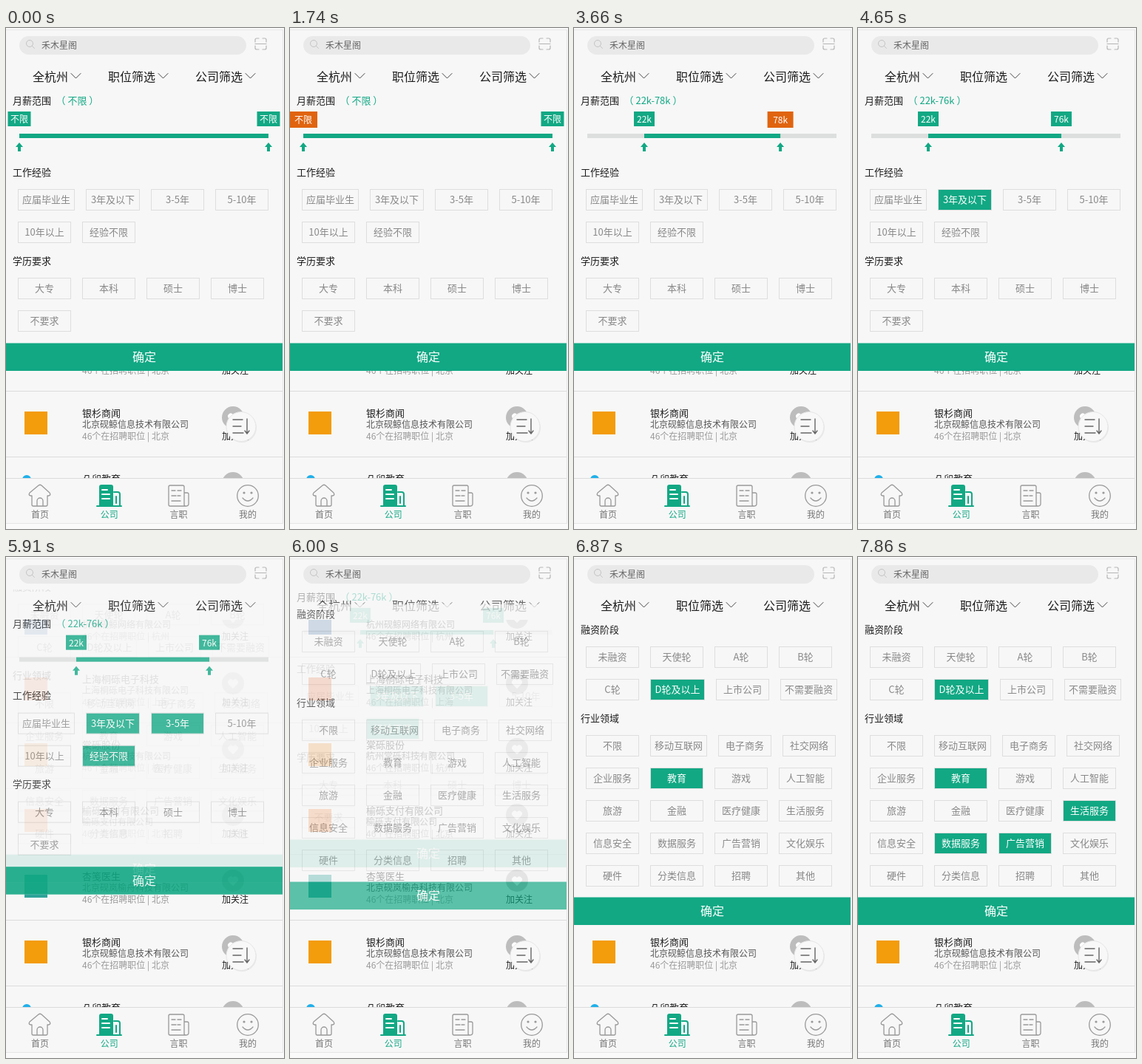
An HTML page that plays this animation: 376 px wide and 678 px high, repeating every 8460 ms.

```html
<!DOCTYPE html>
<html lang="zh-CN">
<head>
<meta charset="utf-8">
<title>职位筛选</title>
<style>
  html, body { margin: 0; width: 100%; height: 100%; overflow: hidden; background: #fafafa; }
  svg { display: block; font-family: "Noto Sans CJK SC", "Noto Sans CJK", "Noto Sans", sans-serif; }
  .line { fill: none; stroke-linecap: round; stroke-linejoin: round; }
  .chip rect { fill: none; stroke: #dedede; }
  .chip text { fill: #888; }
  .chip.on rect { fill: #12a884; }
  .chip.on text { fill: #fff; font-weight: 500; }
</style>
</head>
<body>
<svg id="stage" width="376" height="678" viewBox="0 0 376 678"></svg>
<script>
const LOOP = 8460, STEP = 30;
const GREEN = '#12a884', ORANGE = '#e0640f', PAGE = '#f7f7f7', INK = '#1c1c1c';
const TRACK_LEFT = 18, TRACK_RIGHT = 355;

const text = (s, x, y, size = 13, fill = INK, anchor = 'start', extra = '') =>
  `<text x="${x}" y="${y + size * .37}" font-size="${size}" fill="${fill}" text-anchor="${anchor}" ${extra}>${s}</text>`;
const rect = (x, y, w, h, fill, extra = '') =>
  `<rect x="${x}" y="${y}" width="${w}" height="${h}" fill="${fill}" ${extra}/>`;
const circle = (x, y, r, fill, extra = '') =>
  `<circle cx="${x}" cy="${y}" r="${r}" fill="${fill}" ${extra}/>`;
const line = (d, color, width = 1.3) =>
  `<path class="line" d="${d}" stroke="${color}" stroke-width="${width}"/>`;

// Time at which each option becomes selected.
const selectAt = {
  '3年及以下': 4650, '3-5年': 4950, '经验不限': 5340,
  'D轮及以上': 6570, '教育': 6870, '生活服务': 7200, '广告营销': 7500, '数据服务': 7860
};

const chipWidth = s =>
  Math.max(72, [...s].reduce((w, c) => w + (c >= '一' ? 13 : c > '@' ? 10 : 9), 12));

function chips(y, rows) {
  return rows.map((row, i) => {
    let x = 16;
    return row.split(' ').map(s => {
      const w = chipWidth(s), top = y + i * 44;
      const chip = `<g class="chip" data-on="${selectAt[s] || Infinity}">
        <rect x="${x + .5}" y="${top + .5}" width="${w - 1}" height="28"/>
        ${text(s, x + w / 2, top + 14.5, 13, '', 'middle')}</g>`;
      x += w + 15;
      return chip;
    }).join('');
  }).join('');
}

const panel = (id, bottom, content) => `<g id="${id}">
  ${rect(0, 85, 374, bottom - 85, PAGE)}${content}
  ${rect(0, bottom - 37.5, 374, 37.5, GREEN)}
  ${text('确定', 187, bottom - 18.5, 16, '#fff', 'middle')}</g>`;

const companies = [
  ['杭州砚鲸网络', '杭州砚鲸网络有限公司', '杭州', '#3d6fa8'],
  ['上海桐砾电子科技', '上海桐砾电子科技有限公司', '上海', '#e8703c'],
  ['棠砾股份', '杭州棠砾科技有限公司', '杭州', '#f08a24'],
  ['榆砾支付有限公司', '榆砾支付有限公司', '北京', '#f07a2a'],
  ['杏笺医生', '北京砚岚榆舟科技有限公司', '北京', '#2fa39a'],
  ['银杉商闻', '北京砚鲸信息技术有限公司', '北京', '#f39c0c'],
  ['朵卯教育', '北京朵卯教育科技有限公司', '北京', '#1fb0ea']
];

function company([name, full, city, color], i) {
  const y = 76 + i * 89;
  const logo = i == 6 ? circle(28, y + 1, 6, color) : rect(25, y - 2, 31, 31, color);
  return logo + text(name, 103, y) + text(full, 103, y + 16, 12, '#555') +
    text(`46个在招聘职位 | ${city}`, 103, y + 32, 12, '#999') +
    circle(307, y + 6, 15, '#bdbdbd') +
    `<path d="M307 ${y + 13}l-6-6a3.7 3.7 0 0 1 6-5a3.7 3.7 0 0 1 6 5z" fill="#fff"/>` +
    text('加关注', 310, y + 32, 12, INK, 'middle') +
    rect(0, y + 59, 374, 1, '#dcdcdc');
}

const tab = (label, x) => text(label, x, 66, 16) +
  line(`M${x + label.length * 16 + 4} 61.5l6.5 6.5l6.5-6.5`, '#444', 1);

const GRAY = '#999';
const navBar = rect(0, 609, 374, 61, PAGE) + rect(0, 609, 374, 1, '#dcdcdc') +
  line('M35 633h-2q-3-1-1-4l12-10q2-1.500 4 0l11 10q2 3-1 4h-2v12q0 2-2 2h-17q-2 0-2-2zM42 647v-7a4 4 0 0 1 8 0v7', GRAY) +
  `<path d="M126 647v-26q0-3 3-3h13q3 0 3 3v26z" fill="${GREEN}"/>` +
  line('M130 625h7M130 631h10M130 637h10', '#fff', 2) +
  line('M123 647h33M146 628h5q3 0 3 3v16M149 634v9', GREEN, 2) +
  line('M222 619h17q2 0 2 2v24q0 2 2 2h-21q-2 0-2-2v-24q0-2 2-2zM241 629h4q2 0 2 2v13q0 3-4 3M224 626h5M232 626h5M224 633h6M224 640h12M232 633h4', GRAY) +
  circle(327, 633, 14.3, 'none', `stroke="${GRAY}" stroke-width="1.3"`) +
  circle(322, 629, 1.6, GRAY) + circle(332, 629, 1.6, GRAY) +
  line('M320 636q7 8 14 0', GRAY) +
  ['首页', '公司', '言职', '我的'].map((s, i) =>
    text(s, 46 + i * 93.7, 659, 12, i == 1 ? GREEN : '#777', 'middle')).join('');

const searchBar = rect(0, 3, 374, 41, PAGE) + rect(18, 11, 307, 25, '#e9e9e9', 'rx="12.5"') +
  circle(32, 21, 4.500, 'none', 'stroke="#c4c4c4"') + line('M35.500 24.500l3 3', '#c4c4c4', 1) +
  text('禾木星阁', 48, 24, 12, '#666') +
  line('M337 19v-3q0-2 2-2h3M347 14h3q2 0 2 2v3M352 24v3q0 2-2 2h-3M342 29h-3q-2 0-2-2v-3M337 21.500h15', '#b5b5b5', 1.2);

const sortButton = circle(319, 541, 20, '#000', 'opacity=".06"') + circle(318, 539.5, 20, '#f8f8f8', 'stroke="#e6e6e6"') +
  line('M307 530h13M307 539h11M307 548h14M326 529v20l-3-4M326 549l3-4', '#666', 1.4);

const stage = document.getElementById('stage');
stage.innerHTML = rect(0, 3, 374, 667, PAGE) +
  companies.map(company).join('') +
  rect(0, 3, 374, 82, PAGE) + tab('全杭州', 36) + tab('职位筛选', 138) + tab('公司筛选', 256) +
  panel('jobs', 464,
    text('月薪范围', 9, 98) + '<g id="salary"></g>' +
    text('工作经验', 9, 195) + chips(218, ['应届毕业生 3年及以下 3-5年 5-10年', '10年以上 经验不限']) +
    text('学历要求', 9, 315) + chips(338, ['大专 本科 硕士 博士', '不要求'])) +
  panel('firms', 498,
    text('融资阶段', 9, 98) + chips(121, ['未融资 天使轮 A轮 B轮', 'C轮 D轮及以上 上市公司 不需要融资']) +
    text('行业领域', 9, 218) + chips(241, ['不限 移动互联网 电子商务 社交网络', '企业服务 教育 游戏 人工智能',
      '旅游 金融 医疗健康 生活服务', '信息安全 数据服务 广告营销 文化娱乐', '硬件 分类信息 招聘 其他'])) +
  searchBar + sortButton + navBar +
  rect(0, 2, 375, 1, '#e6e6e6') + rect(374, 2, 1, 669, '#e6e6e6') + rect(0, 670, 375, 1, '#e6e6e6');

const [salary, jobs, firms] = ['salary', 'jobs', 'firms'].map(id => document.getElementById(id));
const allChips = [...document.querySelectorAll('.chip')];

const leftPath = [[1770, 18], [1800, 42], [2160, 160], [2310, 173], [2430, 165], [2580, 123], [2610, 109.3], [2730, 95]];
const rightPath = [[3480, 355], [3510, 344], [3540, 304], [3810, 248], [3960, 248], [4140, 275]];

function follow(path, t) {
  const i = path.findIndex(([time]) => time > t);
  if (i < 0) return path[path.length - 1][1];
  if (i == 0) return path[0][1];
  const [t0, x0] = path[i - 1], [t1, x1] = path[i];
  return x0 + (x1 - x0) * (t - t0) / (t1 - t0);
}

// The CSS "ease" curve.
function ease(x) {
  if (x <= 0 || x >= 1) return x <= 0 ? 0 : 1;
  let lo = 0, hi = 1, s;
  for (let i = 0; i < 20; i++) {
    s = (lo + hi) / 2;
    if (.75 * s * (1 - s) + s ** 3 < x) lo = s; else hi = s;
  }
  return .3 * s * (1 - s) ** 2 + 3 * s * s * (1 - s) + s ** 3;
}

function amount(x, dragging) {
  if (x <= TRACK_LEFT || x >= TRACK_RIGHT) return '不限';
  return Math.floor((x - TRACK_LEFT) / (TRACK_RIGHT - TRACK_LEFT) * 100 + (dragging ? 1 : 0)) + 'k';
}

function handle(x, label, dragging) {
  const w = (label == '不限' ? 24 : 21) + (dragging ? 14 : 7), h = dragging ? 22 : 20;
  return rect(x - w / 2, 113, w, h, dragging ? ORANGE : GREEN) +
    text(label, x, 113 + h / 2 + .5, 12, '#fff', 'middle', 'font-weight="500"') +
    `<path d="M${x} 155l5 6h-3v6h-4v-6h-3z" fill="${GREEN}"/>`;
}

function salaryRange(t) {
  const left = follow(leftPath, t), right = follow(rightPath, t);
  const dragLeft = t >= 1740 && t < 2820, dragRight = t >= 3450 && t < 4200;
  const low = amount(left, dragLeft), high = amount(right, dragRight);
  const range = low == high && low == '不限' ? low : `${low}-${high == '不限' ? '' : high}`;
  return text(`（ ${range} ）`, 67.5, 98, 13, GREEN) +
    rect(TRACK_LEFT, 143, TRACK_RIGHT - TRACK_LEFT, 6, '#dcdfde') +
    rect(left, 143, right - left, 6, GREEN) +
    handle(left, low, dragLeft) + handle(right, high, dragRight);
}

function place(group, opacity, y) {
  group.setAttribute('opacity', opacity);
  group.setAttribute('transform', `translate(0 ${y})`);
}

function frame(now) {
  const t = Math.floor(now % LOOP / STEP) * STEP;
  salary.innerHTML = salaryRange(t);
  for (const chip of allChips) chip.classList.toggle('on', t >= +chip.dataset.on);
  const swap = ease((t - 5890 + STEP / 2) / 315);
  place(jobs, 1 - swap, -65 * swap);
  place(firms, swap, -65 * (1 - swap));
}

const start = performance.now();
(function tick() {
  frame(performance.now() - start);
  requestAnimationFrame(tick);
})();
</script>
</body>
</html>
```
